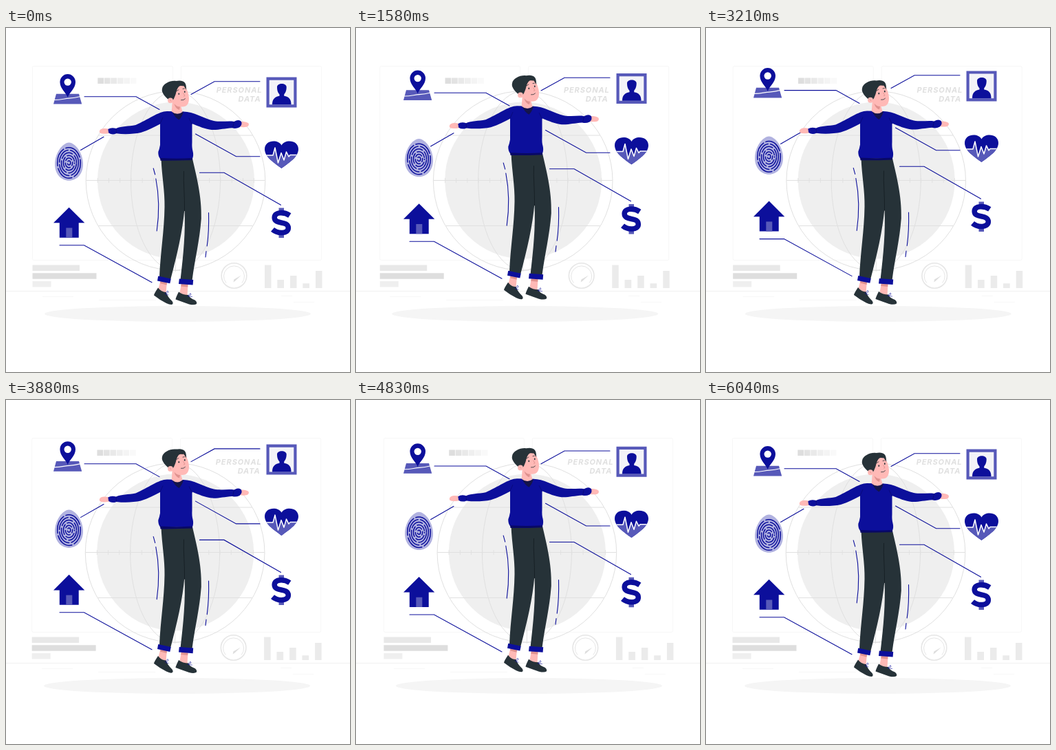
Recreate the animation shown at these times as an HTML page. Size 500 by 500 pixels, loop 6.08 s.

```html
<!DOCTYPE html>
<html lang="en">
<head>
<meta charset="utf-8">
<title>Personal data</title>
<style>
  html, body { margin: 0; height: 100%; overflow: hidden; background: #fff; }
  svg { display: block; width: 100vw; height: 100vh; }
  .line { fill: none; stroke: #e0e0e0; }
  .ink { fill: none; stroke: #0c0f9b; stroke-width: 1.1; stroke-linecap: round; }
  .lace { stroke-width: .6; }
  .blue { fill: #0c0f9b; }
  .mid { fill: #5759b9; }
  .dark { fill: #263238; }
  .skin { fill: #ffb9b6; }
  .shade { fill: #df928f; }
  .cut { fill: none; stroke: #fff; stroke-width: 1.5; stroke-linejoin: round; }
  text { font: italic 700 11px Inter, "Open Sans", sans-serif; letter-spacing: .9px; fill: #e0e0e0; text-anchor: end; }
</style>
</head>
<body>
<svg viewBox="0 0 500 500">
  <path class="line" d="M0 382.5H500" style="stroke:#f0f0f0"/>

  <g id="back">
    <g class="line" style="stroke:#f7f7f7">
      <rect x="38.5" y="55.5" width="204" height="282" rx="2"/>
      <rect x="254.5" y="55.5" width="204" height="282" rx="2"/>
      <path d="M53 390.5H98M135 395.5H218M400 389.5H416M418 398.5H448"/>
    </g>
    <g id="squares"></g>
    <circle cx="247" cy="221.5" r="114" fill="#efefef"/>
    <g class="line">
      <circle cx="246.5" cy="222" r="130.3"/>
      <ellipse cx="246.5" cy="222" rx="65" ry="130.3"/>
      <path d="M134.5 156H358.5M116.5 221.5H376.5M134.5 287.5H358.5M246.5 91.5V354"/>
      <path d="M132.7 221.5H361" stroke-width="7" stroke-dasharray=".9 15.35"/>
    </g>
    <text x="372.5" y="94.3">PERSONAL</text>
    <text x="370.5" y="106.5">DATA</text>
    <path fill="#e8e8e8" d="M38.5 344.5h68.5v8.5h-68.5z"/>
    <path fill="#dedede" d="M38.5 356.3h93v8.5h-93z"/>
    <path fill="#efefef" d="M38.5 368h27v8.5h-27z"/>
    <g class="line" style="stroke:#e6e6e6">
      <circle cx="331.5" cy="360" r="18.3" stroke-width="1.6"/>
      <path d="M320 370.5a15 15 0 1 1 23 0"/>
    </g>
    <path fill="#dedede" d="M330.5 369.5l.8-4 10.5-6-8.5 8z"/>
    <path fill="#ebebeb" d="M376 344.5h9.5V378H376zM394.3 366h9.7v12h-9.7zM413 360h9.5v18H413zM431.3 371.3h9.7v6.7h-9.7zM450 353h9.5v25H450z"/>
    <ellipse cx="249.5" cy="415.5" rx="193.5" ry="11.5" fill="#f5f5f5"/>
  </g>

  <g id="icons">
    <path class="ink" d="M114 99.7H189L223 118.5M108.5 177.5L142 158.3M269 96.5L303 77.8H369M275.5 154L334.5 186.8H369M281.5 210.3H317L399.5 257.3M78 315.7H113.5L212 369.7"/>

    <path class="mid" d="M73 95.8H106L110.2 110.6H69z"/>
    <path class="cut" style="stroke-width:1.2" d="M70 104.5C79 104.8 85 102.5 92 102.2S103 101 108.5 99.5"/>
    <path class="blue" d="M89.7 101C87 93.5 78.4 88 78.4 78.6a11.3 11.5 0 0 1 22.6 0C101 88 92.3 93.5 89.7 101z"/>
    <circle cx="89.7" cy="78.6" r="5.2" fill="#fff"/>

    <path fill="#b1b2e0" d="M91.5 166.5C101 167 112 182 112 198C112 212 103 221.8 91.5 221.8S71 212 71 198C71 182 82 167 91.5 166.5z"/>
    <g id="print" fill="none" stroke="#0c0f9b" stroke-width="1.5" stroke-linecap="round"></g>

    <path class="blue" d="M69 283.3L91.6 260.7L114.3 283.3H105.7V304.7H77.8V283.3z"/>
    <path class="mid" d="M87.3 290.5h9v14.2h-9z"/>

    <path class="mid" d="M378.5 71.5h44v44h-44z"/>
    <path fill="#f3f3f8" d="M382.7 75.7h35.6v35.6h-35.6z"/>
    <path class="blue" d="M394 86C394 79.5 407.7 79.5 407.7 86C407.7 92 405.5 95 404.2 96.5V98.7C411 100 414.5 103 414.5 111.3H387C387 103 391 100 397.5 98.7V96.5C396 95 394 92 394 86z"/>

    <clipPath id="heart"><path d="M400.5 204C391 196.5 376 188 376 176C376 163 395 161 400.5 170.5C406 161 425 163 425 176C425 188 410 196.5 400.5 204z"/></clipPath>
    <g clip-path="url(#heart)">
      <path class="blue" d="M375 160h52v46h-52z"/>
      <path class="mid" d="M375 185H388L391 174L395.5 196L400 181.500L404 192L407.500 180L411 187L413 184.500H427V206H375z"/>
      <path class="cut" d="M375 185H388L391 174L395.5 196L400 181.500L404 192L407.500 180L411 187L413 184.500H427"/>
    </g>

    <path class="mid" d="M396.5 261.500h7.500v6h-7.500zM396.500 299h7.500v6h-7.500z"/>
    <path fill="none" stroke="#0c0f9b" stroke-width="7.600" d="M412.300 272.500C404 267 390.200 267 390.200 275.500C390.200 286.500 410.300 279.300 410.300 290.700C410.300 299.300 395 299.500 387.500 293"/>
  </g>

  <g id="man">
    <path class="ink" d="M214.200 204l2.500 9M217.800 219C222.500 243 222.800 270 219.200 295M294.500 268.500C295 286 294 304 292.200 317M291 324.500l-1 8.500"/>

    <path class="skin" d="M225 366L234 369L232.500 385Q226 383 221.500 379zM255 371L264.500 372L263.500 389Q257 388 252.500 385z"/>
    <path class="shade" d="M224.800 367L234 369.500L233.500 373.500L224 371zM254.800 372L264.500 373L264.200 376.500L254.200 375.500z"/>
    <path class="dark" d="M221 377.500Q226 384 232.500 384Q235 391 241.500 397Q244 400.500 241 402Q238 402.500 233 400Q223 395 215 388.500Q215 386.500 221 377.500z"/>
    <path class="dark" d="M251 383.500Q257 388 265 388Q267 393 274.500 395.500Q278 398 277 401Q274 403.500 266 401.500Q256 398 246.500 394.500Q246.500 392.500 251 383.500z"/>
    <path class="ink lace" d="M231 386l4-4 1 2-4 3 4 1M264 390l4-4.500 1 2-4 2.500 5.500.5"/>

    <path class="dark" d="M225.500 190H271C276 212 285 245 283.800 277C281.500 309 274.500 336 270.500 367L253.500 366C258 328 261 298 259.500 262C257 295 248.500 330 239.300 365L223 362C224.500 326 230 295 230.500 260C231 238 226.500 215 225.500 190z"/>
    <path fill="none" stroke="#172025" d="M258.500 208C257.500 226 260 245 259.500 266"/>
    <path class="blue" d="M221.200 360.500L239.800 364.500L238.300 371.300L220 367.500zM251.800 364.500L272.200 366L271.600 373.600L251 372z"/>

    <path class="skin" d="M150 147Q143 144.800 138 147Q134.500 149.500 136.500 152.500Q140 155 150 153zM341 136Q349 135.500 352.500 138.500Q354 141.500 350.500 143.500Q345 144.800 340 143.500z"/>
    <path class="blue" d="M234 121C222 121 206 133.500 188.500 141C178 143 168 142.500 160 146Q153 144 148.300 147L149.200 152.500Q154 156 160.500 153.300C173 155 186 154 196 152C207 148.500 216 143.500 224 139.500V170Q223 176 221.300 180Q221 186 224 190H271Q273 185 271.500 179Q270 174 270.500 166V139C280 143 290 147 299 148C309 148.500 317 146 329 145.300Q334 147 339.500 144.300Q344 140.500 342 136Q338.500 132 331.500 136C323 134.500 314 137 302 135C288 131.500 272 121.500 258 121.500z"/>
    <path fill="#080866" d="M224 189Q248 190.500 271 189V192Q248 193 224.500 192.800z"/>
    <path fill="none" stroke="#080875" stroke-width=".8" d="M224 139L228 130M270.500 140L266 131M160 146.500L160.500 153M331.500 136.500L329.500 145"/>
    <path fill="#14144a" d="M241.500 121.500Q250 127 258 121.500Q256 129 251.500 133.500Q245 130 241.500 121.500z"/>

    <path class="skin" d="M242 104L240.700 121.500Q249 128 256.500 122L253.500 111z"/>
    <path class="shade" d="M244.500 110Q248 114.500 253 114.500L252 119Q246 117 244.500 110z"/>
    <path class="skin" d="M241 95C244 84 251 80 258 83C262.500 86 265.500 95 266 102C266 110 263 114.500 256 114.500C247 114.500 241 107 241 95z"/>
    <path class="dark" d="M241 107C233 103 225 94 227 88C228 81 239 76 247 77C256 75.500 263 77 262 90C260.500 87 259.500 85.500 258 84C255.500 85 253.500 83 251.500 85C247.500 89 247.500 95 246 98Q244.500 103 241 107z"/>
    <circle class="skin" cx="239" cy="105.300" r="3.900"/>
    <g class="dark"><ellipse cx="251.300" cy="95.700" rx=".9" ry="1.300"/><ellipse cx="259.800" cy="92.700" rx=".9" ry="1.300"/></g>
    <path fill="none" stroke="#263238" stroke-width=".8" stroke-linecap="round" d="M248.300 91.500l2.700-1.700M257 88.500l2.500-.5M254.500 104.800Q258.500 105.500 260.500 102.800"/>
    <path fill="none" stroke="#df928f" stroke-width=".9" d="M257.500 94.500l2.500 4-2 .8M238 104l2 2.500"/>
  </g>
</svg>
<script>
const LOOP = 6080, BOB = 3000;
const $ = id => document.getElementById(id);
const wave = p => (1 - Math.cos(Math.PI * p)) / 2;

$('squares').innerHTML = ['#dedede', '#e3e3e3', '#e9e9e9', '#efefef', '#f4f4f4', '#f9f9f9']
  .map((c, i) => `<rect x="${133.3 + 9.5 * i}" y="72.5" width="8.7" height="8.5" fill="${c}"/>`).join('');

// Broken ridges around the core of the fingerprint
$('print').innerHTML = [...Array(6)].map((_, i) => {
  const r = 2.3 + 2.9 * i;
  return `<ellipse cx="91.5" cy="196" rx="${r}" ry="${r * 1.33}" stroke-dasharray="${7 + 4 * i} 3.6" stroke-dashoffset="${i * 7}"/>`;
}).join('');

// Time and sideways offset of the shaking backdrop
const shake = [[0, 0], [540, -1], [1150, 2], [1640, -4], [2240, 4], [2900, -4],
  [3460, 4], [4200, -4], [4750, 2], [5400, -1], [LOOP, 0]];

function shakeAt(t) {
  const i = shake.findIndex(k => k[0] > t);
  const [t0, x0] = shake[i - 1], [t1, x1] = shake[i];
  return x0 + (x1 - x0) * wave((t - t0) / (t1 - t0));
}

const move = (id, x, y) => $(id).setAttribute('transform', `translate(${x} ${y})`);

function draw(now) {
  const t = now % LOOP;
  move('back', shakeAt(t), 0);
  move('icons', 0, -10.1 * Math.max(0, Math.min(t / 2900, (5980 - t) / 3080)));
  move('man', 0, -8 * wave((t + 40) / BOB * 2));
  requestAnimationFrame(draw);
}
draw(0);
</script>
</body>
</html>
```
